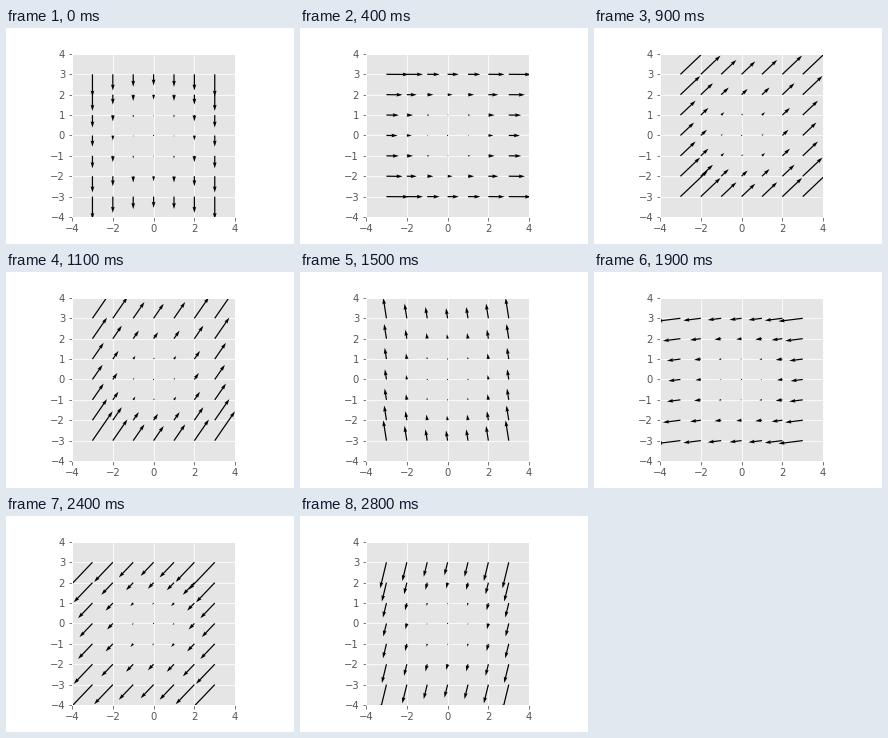
Animation of 288 by 216 pixels, one loop 2.9 s. Source, as a matplotlib script:

```python
import numpy as np
import matplotlib.pyplot as plt
from matplotlib.animation import FuncAnimation

FRAMES = 29
INTERVAL = 100
LAG = np.radians(50)  # vertical part trails the horizontal one

plt.style.use("ggplot")
plt.rcParams.update({
    "font.family": "DejaVu Sans",
    "font.size": 10,
    "figure.facecolor": "white",
    "savefig.facecolor": "white",
})

fig = plt.figure(figsize=(4, 3), dpi=72)
side = 0.755 * 216
ax = fig.add_axes([0.5125 - side / 2 / 288, 0.125, side / 288, 0.755])
ax.set_xlim(-4, 4)
ax.set_ylim(-4, 4)
ax.set_xticks(range(-4, 5, 2))
ax.set_yticks(range(-4, 5))

x, y = np.meshgrid(np.arange(-3, 4), np.arange(-3, 4))
strength = x**2 + y**2


def field(i):
    t = 2 * np.pi * i / FRAMES
    return strength * np.sin(t), strength * np.sin(t - LAG)


arrows = ax.quiver(x, y, *field(0), scale=100, color="black")


def update(i):
    arrows.set_UVC(*field(i))
    return (arrows,)


anim = FuncAnimation(fig, update, frames=FRAMES, interval=INTERVAL,
                     repeat=True, repeat_delay=0)
plt.show()
```
